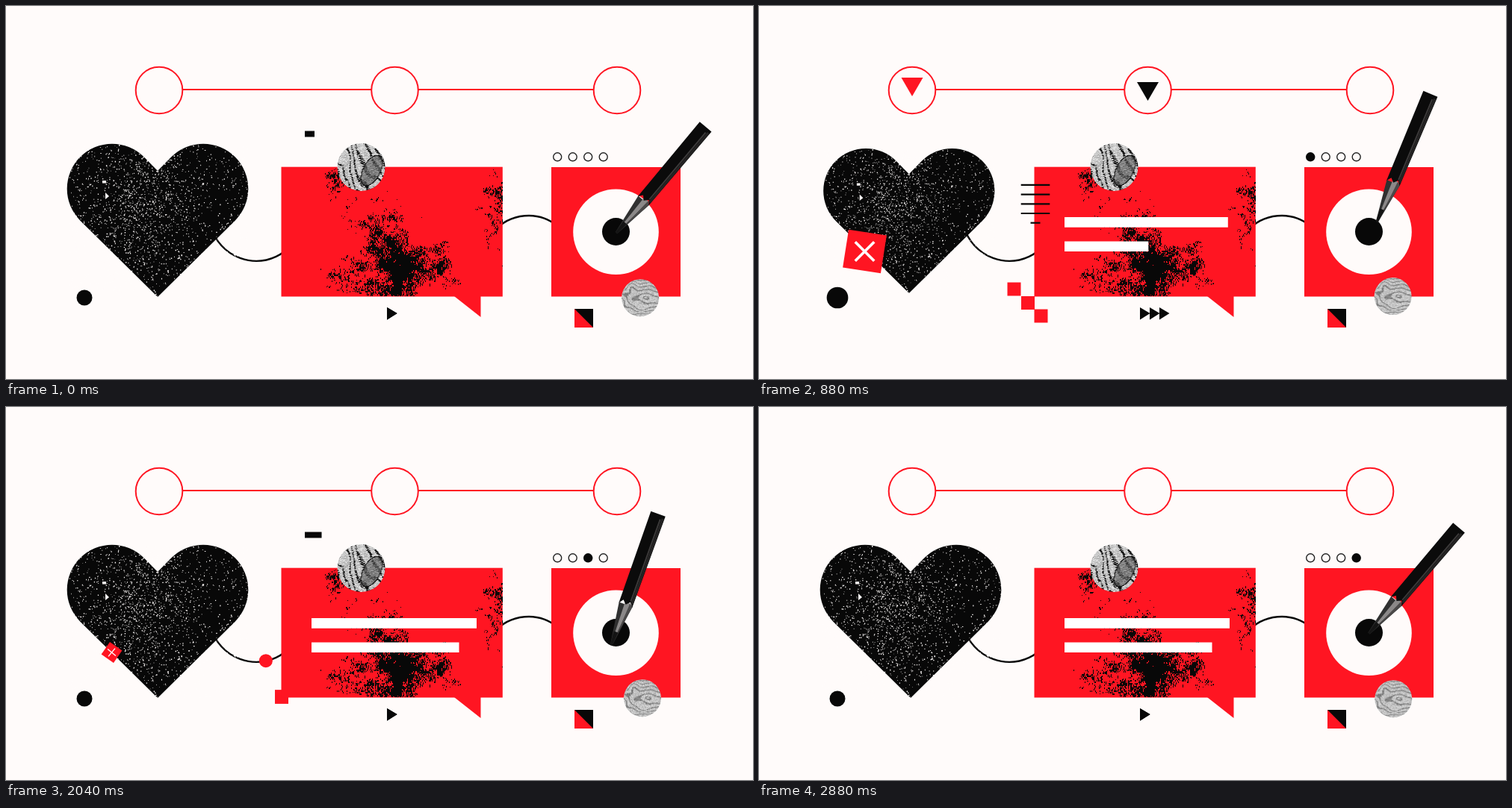
These frames come from a looping animation (1000x500 px, 2.92 s). An HTML page with a canvas:

```html
<!DOCTYPE html>
<html lang="en">
<head>
<meta charset="utf-8">
<title>Heart, message, record</title>
<style>
  html, body { margin: 0; width: 100%; height: 100%; overflow: hidden; background: #fffbfa; }
  canvas { display: block; }
</style>
</head>
<body>
<canvas id="stage" width="1000" height="500"></canvas>
<script>
const LOOP = 2920, STEP = 40;
const PAPER = '#fffbfa', RED = '#ff1522', INK = '#080808';
const ctx = document.getElementById('stage').getContext('2d');
const { PI, sin, cos, hypot, floor, min, max } = Math;

// --- motion ---
const rad = deg => deg * PI / 180;
const clamp = u => min(1, max(0, u));
const progress = (t, from, to) => clamp((t - from) / (to - from));
const easeOut = u => 1 - (1 - u) ** 3;
const easeInOut = u => u < .5 ? 4 * u ** 3 : 1 - 4 * (1 - u) ** 3;
const ramp = (t, from, to, ease = easeInOut) => ease(progress(t, from, to));

// --- drawing helpers ---
function box(x, y, w, h, color) { ctx.fillStyle = color; ctx.fillRect(x, y, w, h); }
function disc(x, y, r, color) {
  ctx.beginPath(); ctx.arc(x, y, r, 0, 7); ctx.fillStyle = color; ctx.fill();
}
function arc(x, y, r, from, to, color, width) {
  ctx.beginPath(); ctx.arc(x, y, r, rad(from), rad(to));
  ctx.strokeStyle = color; ctx.lineWidth = width; ctx.stroke();
}
const ring = (x, y, r, color, width) => arc(x, y, r, 0, 360, color, width);
function poly(color, ...p) {
  ctx.beginPath();
  for (let i = 0; i < p.length; i += 2) ctx.lineTo(p[i], p[i + 1]);
  ctx.closePath(); ctx.fillStyle = color; ctx.fill();
}
function line(x1, y1, x2, y2, color, width) {
  ctx.beginPath(); ctx.moveTo(x1, y1); ctx.lineTo(x2, y2);
  ctx.strokeStyle = color; ctx.lineWidth = width; ctx.stroke();
}
function layer(paint) { ctx.save(); paint(); ctx.restore(); }
function clipDisc(x, y, r, paint) {
  layer(() => { ctx.beginPath(); ctx.arc(x, y, r, 0, 7); ctx.clip(); paint(); });
}

// --- textures ---
const hash = (x, y) => {
  const s = sin(x * 127.1 + y * 311.7) * 43758.5453;
  return s - floor(s);
};
function noise(x, y) {
  const ix = floor(x), iy = floor(y), smooth = u => u * u * (3 - 2 * u);
  const u = smooth(x - ix), v = smooth(y - iy);
  const top = hash(ix, iy) * (1 - u) + hash(ix + 1, iy) * u;
  const bottom = hash(ix, iy + 1) * (1 - u) + hash(ix + 1, iy + 1) * u;
  return top * (1 - v) + bottom * v;
}

// shade(x, y) gives [grey, alpha]
function bake(w, h, shade) {
  const c = document.createElement('canvas');
  c.width = w; c.height = h;
  const g = c.getContext('2d'), img = g.createImageData(w, h);
  for (let y = 0, i = 0; y < h; y++) for (let x = 0; x < w; x++, i += 4) {
    const [grey, alpha] = shade(x, y);
    img.data.fill(grey, i, i + 3);
    img.data[i + 3] = alpha;
  }
  g.putImageData(img, 0, 0);
  return c;
}

const grunge = bake(296, 173, (x, y) => {
  const blot = (cx, cy, rx, ry) => Math.exp(-(((x - cx) / rx) ** 2) - ((y - cy) / ry) ** 2);
  const trunk = .55 * blot(158, 148, 22, 48) + .45 * blot(128, 92, 36, 48);
  const foot = .36 * blot(100, 150, 46, 32);
  const side = .44 * blot(204, 130, 36, 34);
  const edges = .42 * blot(288, 50, 24, 55) + .38 * blot(72, 18, 16, 30);
  const grain = .38 * noise(x / 11, y / 11) + .27 * noise(x / 3, y / 4)
    + .35 * hash(x, floor(y / 2));
  return [8, trunk + foot + side + edges + grain > .94 ? 255 : 0];
});

const wood = bake(52, 52, (x, y) => {
  const d = hypot((x - 32) / 1.7, y - 25) + 12 * noise(x / 13, y / 10);
  return [222 - 130 * max(0, sin(d * 1.4) - .45) - 55 * hash(x, y), 255];
});

const engraving = bake(66, 66, (x, y) => {
  const leaf = hypot((x - 48 + (y - 33) * .35) / 13, (y - 37) / 21);
  const d = x * .75 - y * .3 + 20 * noise(x / 14, y / 19);
  const cut = sin(d * .62) + .9 * (hash(x, y) - .5);
  if (leaf < 1) return [leaf > .92 ? 20 : 165 - 50 * (cut > .5) - 70 * hash(x, y), 255];
  return [cut > .72 ? 15 : 240 - 85 * hash(y, x), 255];
});

const textured = (img, x, y, r) =>
  clipDisc(x, y, r, () => ctx.drawImage(img, x - img.width / 2, y - img.height / 2));

const heart = new Path2D();
heart.moveTo(203, 390);
heart.arc(142, 245, 60.3, rad(135), rad(315));
heart.lineTo(203, 221);
heart.arc(264, 245, 60.3, rad(225), rad(405));
heart.closePath();

const specks = new Path2D();
for (let i = 0; i < 8000; i++) {
  const x = 82 + 242 * hash(i, 1), y = 186 + 204 * hash(i, 2);
  const density = .17 + .5 * Math.exp(-(((x - 184) / 46) ** 2) - ((y - 268) / 68) ** 2);
  if (hash(i, 3) < density)
    specks.rect(x, y, .5 + hash(i, 4), .5 + 1.2 * hash(i, 5));
}
specks.rect(129, 234, 5, 3.5);
specks.moveTo(133, 250); specks.lineTo(138, 255); specks.lineTo(133, 259);

// --- scene parts ---
function timeline(t) {
  line(237, 112, 489, 112, RED, 2);
  line(552, 112, 786, 112, RED, 2);
  [205, 520.5, 818].forEach((x, i) => {
    const arrive = 60 + 510 * i, leave = arrive + 740;
    const y = 54 + 48 * ramp(t, arrive, arrive + 240)
      - 6 * ramp(t, leave, leave + 80) + 54 * ramp(t, leave + 80, leave + 180);
    clipDisc(x, 113, 31, () => poly(i % 2 ? INK : RED, x - 14.5, y, x + 14.5, y, x, y + 25));
    ring(x, 113, 31.3, RED, 2);
  });
}

function heartAndDot(t) {
  const beat = .055 * sin(2 * PI * progress(t, 430, 1030));
  const swell = .06 * sin(PI * progress(t, 2040, 2660));
  const scale = 1 + beat + swell;
  layer(() => {
    ctx.translate(163, 297); ctx.scale(scale, scale); ctx.translate(-163, -297);
    ctx.fillStyle = INK; ctx.fill(heart);
    ctx.fillStyle = PAPER; ctx.fill(specks);
  });
  disc(105, 391, 10.5 - 70 * (scale - 1), INK);
}

function badge(t) {
  const leave = ramp(t, 1840, 2210);
  const size = ramp(t, 640, 880) - leave;
  if (size < .01) return;
  layer(() => {
    ctx.translate(141.5, 329); ctx.scale(size, size);
    layer(() => {
      ctx.rotate(rad(60 * (1 - ramp(t, 640, 1000)) + 57 * leave));
      box(-25.7, -25.7, 51.4, 51.4, RED);
    });
    ctx.rotate(rad(90 * ramp(t, 640, 1120) + 65 * leave));
    line(-18, 0, 18, 0, '#fff', 3.6);
    line(0, -18, 0, 18, '#fff', 3.6);
  });
}

function wires(t) {
  arc(335, 278.7, 63, 20, 165, INK, 2.4);
  arc(699.5, 342, 61, 220, 320, INK, 2.4);
  for (const start of [180, 1850]) {
    const u = (t - start) / 270;
    if (u < 0 || u > 1) continue;
    const a = rad(150 - 102 * u);
    disc(335 + 63 * cos(a), 278.5 + 63 * sin(a), 9, RED);
  }
}

function cornerSquares(t) {
  const out = ramp(t, 100, 290) - ramp(t, 1900, 2180);
  if (out <= 0) return;
  const back = ramp(t, 1500, 1860);
  const lower = 17.5 * (ramp(t, 210, 500) - back), upper = 18.5 * (ramp(t, 340, 640) - back);
  const x = 351 + 18 * (1 - out), y = 389 - 19 * (1 - out);
  for (const d of [-upper, 0, lower]) box(x + d, y + d, 18, 18, RED);
}

function bubble(t) {
  box(368.5, 215.7, 296.3, 173.8, RED);
  poly(RED, 600, 389, 635.5, 389, 635.5, 417);
  ctx.drawImage(grunge, 369, 216);
  box(409, 283, 221 * ramp(t, 209, 1064, easeOut), 13.7, '#fff');
  box(409, 315.5, 197.5 * ramp(t, 671, 1526, easeOut), 13.5, '#fff');
  textured(engraving, 475.5, 216, 32);
}

function speedLines(t) {
  for (let i = 0; i < 6; i++) {
    const half = 19.3 * (ramp(t, 100 + 55 * i, 350 + 55 * i) - ramp(t, 710 + 80 * i, 870 + 80 * i));
    const y = 303.4 - 12.7 * i;
    if (half > .2) line(370 - half, y, 370 + half, y, INK, 2.2);
  }
}

function dash(t) {
  const local = t < 1000 ? t : t - 1950;
  if (local < -120 || local > 460) return;
  const end = min(447, 413 + .106 * local);
  const start = min(end, 400 + .119 * max(0, local - 160));
  box(start, 167.5 + 3.3 * progress(local, 120, 320), end - start, 8, INK);
}

function playMarks(t) {
  const back = ramp(t, 1300, 1580);
  for (const d of [0, 13 * (ramp(t, 130, 400) - back), 26 * (ramp(t, 60, 300) - back)])
    poly(INK, 510 + d, 404, 510 + d, 420.5, 523.5 + d, 412);
}

// The tip circles the record and spirals back to its centre while the shaft sways.
function pencil(t) {
  const turn = 2 * PI * t / LOOP;
  const settle = 1 - progress(t, 2300, 2900) ** 2;
  const r = (20 - t / 460) * ramp(t, 0, 320, easeOut) * settle;
  const a = rad(175 + .147 * t);
  const tilt = rad(25.7 + 14.3 * cos(turn) - 2.5 * sin(2 * turn));
  layer(() => {
    ctx.translate(817 + r * cos(a), 304.3 + r * sin(a));
    ctx.rotate(tilt);
    poly('#303030', -9.5, -57, 9.5, -57, 1.5, 0, -1.5, 0);
    poly('#8b8888', -2, -61, 6, -60, 2, -18, -1, -18);
    poly('#4b4949', 5, -60, 9.5, -57, 2, -12);
    poly('#141414', -3, -18, 3, -18, 1.4, 0, -1.4, 0);
    poly('#0b0b0b', -10.3, -186, 10.3, -186, 9.5, -56, 5, -62, 0, -57, -5, -62, -9.5, -56);
    line(5, -180, 5, -63, '#3d3b3b', 1.8);
    line(8, -182, 7.6, -60, '#242323', 3.4);
  });
}

function record(t) {
  box(730, 216, 173, 173.5, RED);
  disc(816.5, 302.8, 57.3, PAPER);
  disc(816.5, 302.5, 18.5, INK);
  const active = floor(t / 740 - .2);
  for (let i = 0; i < 4; i++) {
    const x = 738.2 + 20.5 * i;
    if (i === active) disc(x, 202.3, 6.2, INK);
    else ring(x, 202.3, 5.5, '#222', 1.4);
  }
  const a = rad(117 + 360 * t / LOOP);
  textured(wood, 850 + 2 * cos(a), 390 + 1.3 * sin(a), 25);
  box(761, 406, 25, 25, RED);
  poly(INK, 761, 406, 786, 406, 786, 431);
}

function draw(now) {
  const t = floor(now % LOOP / STEP) * STEP;
  box(0, 0, 1000, 500, PAPER);
  for (const part of [timeline, wires, heartAndDot, badge, cornerSquares, bubble,
    speedLines, dash, playMarks, record, pencil]) part(t);
}

let begin;
function frame(now) {
  begin ??= now;
  draw(now - begin);
  requestAnimationFrame(frame);
}
draw(0);
requestAnimationFrame(frame);
</script>
</body>
</html>
```
